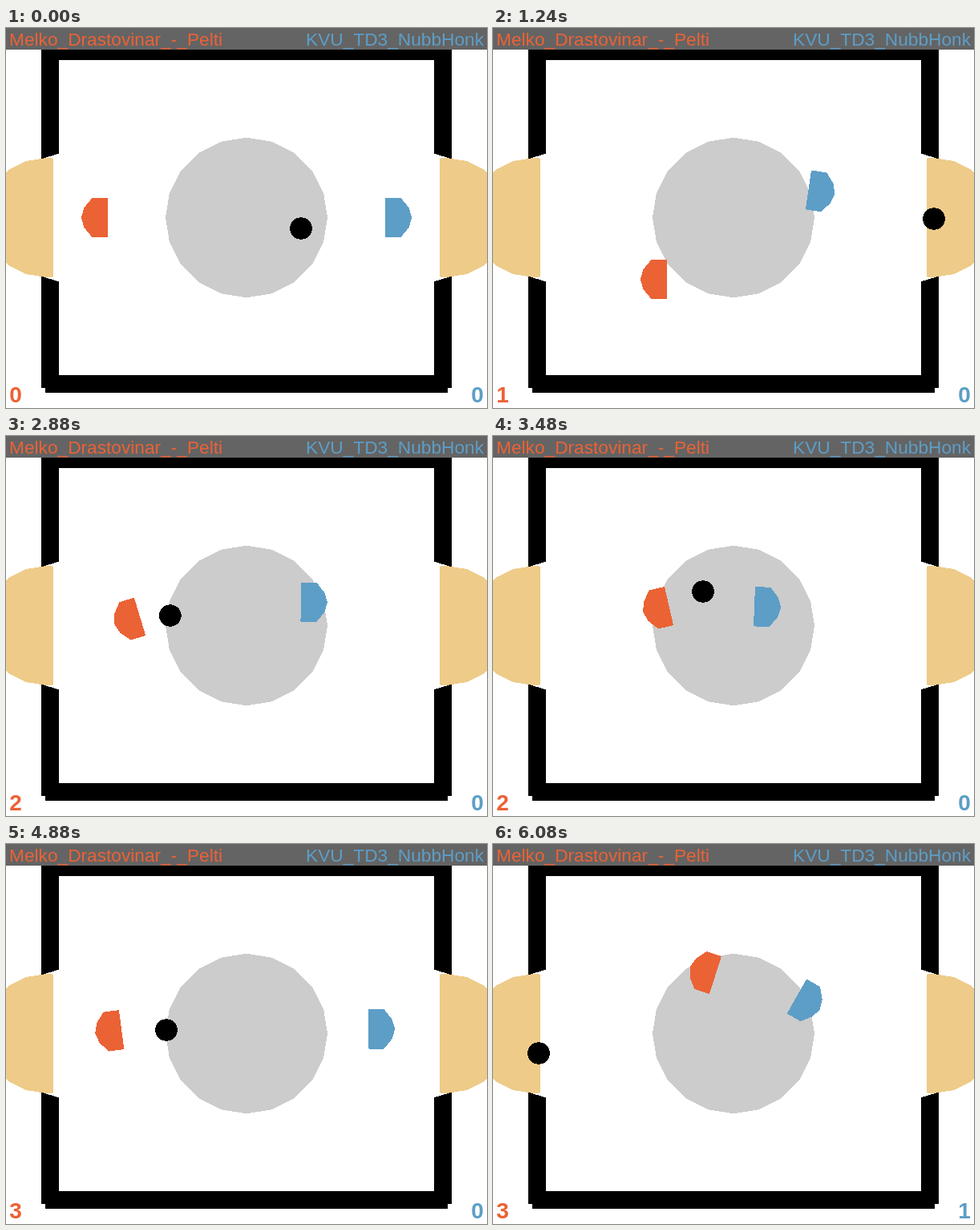
Animation, 600 px wide and 474 px high, one loop 7320 ms. Source, as an HTML page:

```html
<!DOCTYPE html>
<html lang="en">
<head>
<meta charset="utf-8">
<title>Table hockey</title>
<style>
  html, body { margin: 0; width: 100%; height: 100%; overflow: hidden; background: #fff; }
  svg { display: block; shape-rendering: crispEdges; }
  polygon { stroke-width: 2; stroke-linejoin: round; }
  text { font: 22.7px "Liberation Sans", Arial, sans-serif; }
  .score { font-size: 28px; font-weight: bold; text-anchor: middle; }
  .left { fill: #eb6235; stroke: #eb6235; }
  .right { fill: #5d9ec7; stroke: #5d9ec7; }
  .black { fill: #000; stroke: #000; }
  .goal { fill: #eecb88; stroke: #eecb88; }
  .centre { fill: #ccc; stroke: #ccc; }
  text.left, text.right { stroke: none; }
</style>
</head>
<body>
<svg id="stage" width="600" height="474" viewBox="0 0 600 474">
  <g id="rink"></g>
  <rect width="600" height="27" fill="#646464"/>
  <text class="left" x="4" y="22">Melko_Drastovinar_-_Pelti</text>
  <text class="right" x="596" y="22" text-anchor="end">KVU_TD3_NubbHonk</text>
  <text class="left score" id="leftScore" x="12" y="467"></text>
  <text class="right score" id="rightScore" x="588" y="467"></text>
  <g id="left"></g>
  <g id="right"></g>
  <g id="puck"></g>
</svg>
<script>
const LOOP = 7320, STEP = 40, LAST_MOVE = 6080;
const MID_X = 300, MID_Y = 236.5, Y_SCALE = 0.9875;
const TOP_BOUNCE = 55, RIGHT_BOUNCE = 520, MOUTH = 74;
const SERVE = { left: [120, MID_Y, 0], right: [480, MID_Y, 0] };

const byId = id => document.getElementById(id);
const flipX = points => points.map(([x, y]) => [2 * MID_X - x, y]);
const flipY = points => points.map(([x, y]) => [x, 2 * MID_Y - y]);

function addPolygon(parentId, className, points) {
  const shape = document.createElementNS(byId("stage").namespaceURI, "polygon");
  shape.setAttribute("class", className);
  shape.setAttribute("points", points.join(" "));
  byId(parentId).append(shape);
}

// Part of a 20-sided circle, from corner number `first` to `last`.
function arc(cx, cy, radius, first = 0, last = 19) {
  return Array.from({ length: last - first + 1 }, (_, i) => {
    const angle = (first + i) * Math.PI / 10;
    return [cx + radius * Math.cos(angle), cy + radius * Y_SCALE * Math.sin(angle)];
  });
}

function buildScene() {
  const endWall = [[50, 19], [550, 19], [550, 39], [50, 39]];
  const sideWall = [[45, 25], [65, 25], [65, 156], [45, 162]];
  const rim = arc(48, MID_Y, MOUTH, 5, 15);
  const goal = [[58, rim[0][1]], ...rim, [58, rim[10][1]]];

  addPolygon("rink", "centre", arc(MID_X, MID_Y, 100));
  for (const wall of [endWall, sideWall, flipX(sideWall)]) {
    addPolygon("rink", "black", wall);
    addPolygon("rink", "black", flipY(wall));
  }
  addPolygon("rink", "goal", goal);
  addPolygon("rink", "goal", flipX(goal));

  const upperHalf = [[-25.2, 0], [-21.6, -12], [-12, -24], [6, -24]];
  const lowerHalf = upperHalf.map(([x, y]) => [x, -y]).reverse();
  const racket = [...upperHalf, ...lowerHalf].map(([x, y]) => [x, y * Y_SCALE]);
  addPolygon("left", "left", racket);
  addPolygon("right", "right", racket.map(([x, y]) => [-x, y]));
  addPolygon("puck", "black", arc(0, 0, 13));
}

// Rackets glide from the serve through poses [ms, x, y, degrees].
// The puck rests until its first hit [ms, x, y], then flies straight from hit to hit;
// a hit beyond a wall means that it bounces there.
const rounds = [
  {
    start: 0, scorer: "left", goalTime: 1240,
    left: [[920, 140, 306, 0], [1240, 210, 313.5, 0]],
    right: [[440, 390, 250, -4], [1240, 400.4, 203, 8.4]],
    puck: [[440, 368, 250], [920, 160, -190], [1240, 550, 238]]
  },
  {
    start: 1280, scorer: "left", goalTime: 1840,
    left: [[1520, 194, 245, 0]],
    right: [[1840, 400, 205, 5]],
    puck: [[1520, 215, 245], [1840, 538, 228]]
  },
  {
    start: 1880, scorer: "left", goalTime: 4640,
    left: [[2280, 108, 241, -20.7], [3480, 212.7, 213.6, -13], [4280, 201, MID_Y, 0], [4640, 155, 352, 0]],
    right: [[2280, 416.5, 202, -1], [3480, 333, 213, 2.3], [4280, 331.8, 219, 12], [4640, 350, 262, 8]],
    puck: [[2280, 403, 221], [2640, 136, 240], [3240, 308, 200], [3480, 262, 194],
      [3800, 515, 54], [4280, 585, -186], [4400, 400, 300], [4640, 561, 265]]
  },
  {
    start: 4680, scorer: "right", goalTime: 6080,
    left: [[5480, 229.8, 211, -47.5], [6080, 270.8, 161.4, 17.7]],
    right: [[5480, 345.5, 200.5, -1], [6080, 385, 193.5, 29.7]],
    puck: [[5000, 200, 232], [5480, 326, 203], [6080, 57, -151]]
  }
];

const linear = part => part;
const smooth = part => part * part * (3 - 2 * part);

function sample(keys, time, ease) {
  const next = keys.findIndex(key => key[0] > time);
  if (next === 0) return keys[0].slice(1);
  if (next < 0) return keys[keys.length - 1].slice(1);
  const [fromTime, ...from] = keys[next - 1];
  const [toTime, ...to] = keys[next];
  const part = ease((time - fromTime) / (toTime - fromTime));
  return from.map((value, i) => value + (to[i] - value) * part);
}

function bounce([x, y]) {
  const foldedY = TOP_BOUNCE + Math.abs(y - TOP_BOUNCE);
  const inMouth = Math.abs(foldedY - MID_Y) < MOUTH;
  return [inMouth ? x : RIGHT_BOUNCE - Math.abs(RIGHT_BOUNCE - x), foldedY];
}

function place(id, [x, y, angle = 0]) {
  byId(id).setAttribute("transform", `translate(${x} ${y}) rotate(${angle})`);
}

function draw(now) {
  const time = Math.min(Math.floor(now % LOOP / STEP) * STEP, LAST_MOVE);
  const round = rounds.findLast(({ start }) => start <= time);

  for (const side of ["left", "right"]) {
    const poses = [[round.start, ...SERVE[side]], ...round[side]];
    place(side, sample(poses, time, smooth));
    byId(side + "Score").textContent =
      rounds.filter(({ scorer, goalTime }) => scorer === side && goalTime <= time).length;
  }
  place("puck", bounce(sample(round.puck, time, linear)));
}

buildScene();
const startTime = performance.now();
function tick() {
  draw(performance.now() - startTime);
  requestAnimationFrame(tick);
}
tick();
</script>
</body>
</html>
```
